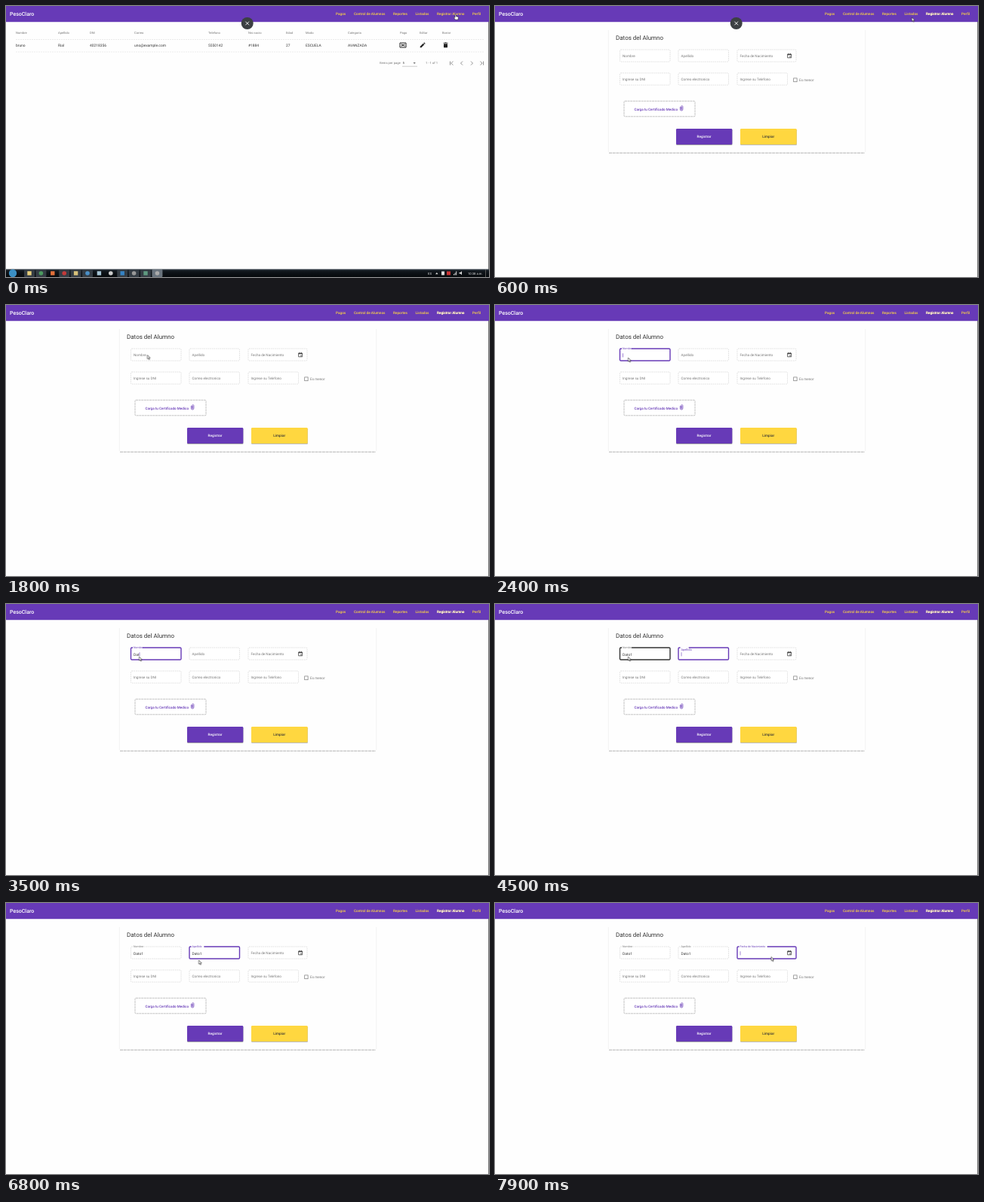
Recreate the animation shown at these times as an HTML page. Size 640x360 px, loop 8 s.

```html
<!DOCTYPE html>
<html lang="es">
<head>
<meta charset="utf-8">
<title>Registro de alumnos</title>
<style>
  html, body { margin: 0; width: 100%; height: 100%; overflow: hidden; background: #fefefe; }
  svg { display: block; width: 100%; height: 100%; }
  text { font-family: Roboto, "Liberation Sans", sans-serif; font-size: 4.65px; text-rendering: geometricPrecision; }
  .nav { fill: #ffd740; font-weight: 500; }
  .nav text { font-size: 4.7px; }
  .head text { fill: #777; font-size: 4.1px; }
  .row text { fill: #333; font-size: 4.9px; }
  .dim { fill: #777; }
  .strong { font-weight: 500; }
  .rule { stroke: #ddd; stroke-width: .6; stroke-dasharray: 2 1; }
  .icon { fill: none; stroke: #777; stroke-width: .8; }
  .box { fill: #fff; stroke: #ccc; stroke-width: .6; stroke-dasharray: 1.6 1; }
  .box.hover { stroke: #333; stroke-width: 1.4; stroke-dasharray: none; }
  .box.focus { stroke: #673ab7; stroke-width: 1.4; stroke-dasharray: none; }
  .label { fill: #777; }
  .label.focus { fill: #673ab7; }
  .value { fill: #333; font-size: 4.9px; }

  .list, .form, .lit, .bar, .close, .pointer, .hand, .arrow { animation: 8s linear infinite; }
  .list, .hand { animation-name: before; }
  .form, .lit, .arrow { animation-name: after; }
  .bar { animation-name: bar; }
  .close { animation-name: close; }
  .pointer { animation-name: pointer; }
  @keyframes before { 0%, 4.99% { visibility: visible } 5%, 100% { visibility: hidden } }
  @keyframes after { 0%, 4.99% { visibility: hidden } 5%, 100% { visibility: visible } }
  @keyframes bar { 0%, 2.49% { visibility: visible } 2.5%, 100% { visibility: hidden } }
  @keyframes close {
    0%, 19.4% { transform: translate(0, 0); animation-timing-function: ease-in }
    21.9%, 100% { transform: translate(0, -34px) }
  }
  @keyframes pointer {
    0%, 5% { transform: translate(595px, 11px); animation-timing-function: ease-in-out }
    15% { transform: translate(268px, 42px); animation-timing-function: ease-in-out }
    25%, 28% { transform: translate(175.5px, 70px) }
    30%, 76.9% { transform: translate(176.5px, 70px); animation-timing-function: ease-in-out }
    82.5%, 89.4% { transform: translate(255.5px, 76px); animation-timing-function: ease-in-out }
    93.6%, 100% { transform: translate(366px, 71.5px) }
  }
</style>
</head>
<body>
<svg viewBox="0 0 640 360" preserveAspectRatio="none">
  <defs>
    <linearGradient id="glass" x2="0" y2="1">
      <stop offset="0" stop-color="#3c4650"/>
      <stop offset=".25" stop-color="#10161c"/>
      <stop offset="1" stop-color="#05080b"/>
    </linearGradient>
  </defs>
  <rect width="640" height="360" fill="#fefefe"/>

  <g class="list">
    <g class="head" id="head"></g>
    <g class="row" id="row"></g>
    <path class="rule" d="M13 44.5H634M13 61H634"/>
    <g fill="#222">
      <path d="M522 49h8v6h-8z" fill="none" stroke="#222"/>
      <path d="M524.4 50v4M527.8 50v4" stroke="#222" stroke-width=".7"/>
      <circle cx="526" cy="52" r="1.1"/>
      <path d="M548.7 55.3v-1.6l4-4 1.6 1.6-4 4zM553.2 49.2l.9-.9 1.6 1.6-.9.9z"/>
      <path d="M580 50.2h5v4.2q0 .9-.9.9h-3.2q-.9 0-.9-.9zM579.5 48.8h1.7l.5-.5h1.6l.5.5h1.7v.8h-6z"/>
    </g>
    <text class="dim" x="495" y="77.4" font-size="4.2" style="font-size:4.2px">Items per page</text>
    <text x="525.5" y="77.4" fill="#444" style="font-size:4.2px">5</text>
    <path d="M539.5 75h3.4l-1.7 1.8z" fill="#666"/>
    <path d="M525 80.2h20" stroke="#aaa" stroke-width=".6"/>
    <text class="dim" x="556" y="77.4" style="font-size:4.2px">1 - 1 of 1</text>
    <path class="icon" d="M588.5 73.5v5M592.3 73.5l-2.5 2.5 2.5 2.5M605 73.5l-2.5 2.5 2.5 2.5M616 73.5l2.5 2.5-2.5 2.5M628.5 73.5l2.5 2.5-2.5 2.5M632.5 73.5v5"/>
  </g>

  <g class="form">
    <rect x="150" y="24" width="341" height="171" fill="#fefefe"/>
    <path d="M150.3 32V194M490.7 32V194" stroke="#eee" stroke-width=".7"/>
    <path d="M151 195.2H490" stroke="#aaa" stroke-width=".9" stroke-dasharray="4 .7"/>
    <text x="160" y="45.3" fill="#333" style="font-size:8px">Datos del Alumno</text>
    <g id="fields"></g>
    <g fill="none" stroke="#444" stroke-width=".8">
      <path d="M387.6 64h5v4.8h-5zM388.8 62.8v1M391.4 62.8v1"/>
      <path d="M387.6 64.6h5" stroke-width="1.3"/>
      <path d="M390.3 67h1.2v1h-1.2z" stroke-width=".5"/>
    </g>
    <rect x="395.7" y="95.9" width="4.4" height="4.8" fill="#fff" stroke="#777" stroke-width=".7"/>
    <text class="dim" x="403" y="99.8">Es menor</text>
    <rect x="171" y="126.3" width="94" height="20.5" rx="1" fill="#fff" stroke="#aaa" stroke-width=".7" stroke-dasharray="3 .6"/>
    <text class="strong" x="184.5" y="139.3" fill="#673ab7" style="font-size:4.6px">Carga tu Certificado Medico</text>
    <path d="M245.3 134v3.2a1.8 1.8 0 0 0 3.6 0v-3.4a1.2 1.2 0 0 0-2.4 0v3.2a.5.5 0 0 0 1.2 0V134" fill="none" stroke="#673ab7" stroke-width=".7"/>
    <g text-anchor="middle" class="strong">
      <rect x="240" y="164" width="74.5" height="21" rx="1.3" fill="#aaa"/>
      <rect x="240" y="163" width="74.3" height="21" rx="1.3" fill="#673ab7"/>
      <text x="277" y="175.2" fill="#fff">Registrar</text>
      <rect x="325" y="164" width="75" height="21" rx="1.3" fill="#bbb"/>
      <rect x="325" y="163" width="74.7" height="21" rx="1.3" fill="#ffd740"/>
      <text x="362.2" y="175.2" fill="#333">Limpiar</text>
    </g>
  </g>

  <rect width="640" height="21.2" fill="#673ab7"/>
  <text class="strong" x="5" y="13.2" fill="#fff" style="font-size:7px">PesoClaro</text>
  <g class="nav">
    <text x="437" y="12.3">Pagos</text>
    <text x="461" y="12.3">Control de Alumnos</text>
    <text x="513" y="12.3">Reportes</text>
    <text x="542.5" y="12.3">Listados</text>
    <text x="571" y="12.3">Registrar Alumno</text>
    <text class="lit" x="571" y="12.3" fill="#fff">Registrar Alumno</text>
    <text x="618" y="12.3">Perfil</text>
  </g>
  <path d="M639.5 21V360" stroke="#555" stroke-width=".8"/>

  <g class="close">
    <circle cx="319.7" cy="23" r="8" fill="#3c4043"/>
    <path d="M317.4 20.7l4.6 4.6M322 20.7l-4.6 4.6" stroke="#fff" stroke-width=".9"/>
  </g>

  <g class="bar">
    <rect y="349.5" width="640" height="10.5" fill="url(#glass)"/>
    <circle cx="9" cy="355" r="5.2" fill="#3b8fc4"/>
    <g id="tasks"></g>
    <g fill="#ddd">
      <text x="559" y="356.5" style="font-size:4.2px">ES</text>
      <path d="M569 356.2l1.8-2.2 1.8 2.2zM577 352.5h4v5h-4zM593 357.5v-1.5h1v1.5zM594.6 357.5v-3h1v3zM596.2 357.5v-5h1v5zM600.5 354h1.5l2-1.7v5l-2-1.7h-1.5z"/>
      <rect x="584" y="352.5" width="5" height="5" fill="#c33"/>
      <text x="612" y="356.7" style="font-size:4.2px">10:38 a.m.</text>
    </g>
    <path d="M635.5 350V360" stroke="#555"/>
  </g>

  <g class="pointer" stroke="#222" stroke-width=".6" fill="#fff" stroke-linejoin="round">
    <path class="hand" d="M0 .5q.7-.9 1.3 0v2.2l2.8.7q.6.3.4 1l-.6 2.8H.4l-2-2.7q0-.9.9-.6l.7.6z"/>
    <path class="arrow" d="M0 0v5.2l1.2-1 .9 1.9.9-.4-.9-1.9h1.7z"/>
  </g>
</svg>
<script>
const LOOP = 8000, BLINK = 530, FLOAT = 150;
const $ = id => document.getElementById(id);

function add(parent, tag, attrs, content = "") {
  const el = document.createElementNS("http://www.w3.org/2000/svg", tag);
  for (const key in attrs) el.setAttribute(key, attrs[key]);
  el.textContent = content;
  return parent.appendChild(el);
}

const columns = [
  [13, "Nombre", "bruno"], [69, "Apellido", "Rial"], [111, "DNI", "40218356"],
  [170, "Correo", "uno@example.com"], [268, "Telefono", "5550142"], [321, "Nro socio", "#1884"],
  [371, "Edad", "27"], [397, "Modo", "ESCUELA"], [453, "Categoria", "AVANZADA"],
  [522, "Pago", ""], [548, "Editar", ""], [578, "Borrar", ""]
];
for (const [x, title, value] of columns) {
  add($("head"), "text", { x, y: 37 }, title);
  add($("row"), "text", { x, y: 54.2 }, value);
}

// Plain taskbar marks: squares for windows, circles for round programs.
const marks = ["#e8cf7a", "#4b9a5f", "#e2703a", "#c33a3a", "#d9c27a", "#4a90c8",
  "#a5c4d4", "#ccc", "#3583c5", "#999", "#5f9a80", "#aaa"];
marks.forEach((fill, i) => {
  const x = 31 + i * 15.4;
  if (![2, 6, 7].includes(i)) {
    add($("tasks"), "rect", { x: x - 7, y: 350, width: 14, height: 10, rx: 1, fill: i === 11 ? "#69737d" : "#343c44" });
  }
  if (i % 2) add($("tasks"), "circle", { cx: x, cy: 355, r: 2.8, fill });
  else add($("tasks"), "rect", { x: x - 2.7, y: 352.3, width: 5.4, height: 5.4, fill });
});

// Times in ms: focus, blur, hover spans and one entry per typed key.
const specs = [
  { x: 165.5, y: 58, label: "Nombre", word: "Dato1", focus: 2150, blur: 4400,
    hover: [[1900, 2150], [4400, 6320]], keys: [2900, 3100, 3300, 3700, 4000] },
  { x: 243, y: 58, label: "Apellido", word: "Dato1", focus: 4400, blur: 7500,
    keys: [4700, 4900, 5050, 5200, 6000] },
  { x: 321, y: 58, w: 78, label: "Fecha de Nacimiento", focus: 7500, blur: LOOP, hover: [[7400, 7500]] },
  { x: 165.5, y: 89, label: "Ingrese su DNI" },
  { x: 243, y: 89, label: "Correo electronico" },
  { x: 321, y: 89, label: "Ingrese su Telefono" }
];

const fields = specs.map(spec => {
  const { x, y, w = 66.5, label } = spec, root = $("fields");
  return {
    word: "", focus: Infinity, blur: Infinity, hover: [], keys: [], ...spec,
    box: add(root, "rect", { class: "box", x, y, width: w, height: 16, rx: 1.3 }),
    notch: add(root, "rect", { x: x + 2.5, y: y - 1, height: 2, fill: "#fefefe" }),
    tag: add(root, "text", { x: x + 3.5 }, label),
    value: add(root, "text", { class: "value", x: x + 3.5, y: y + 10.6 }),
    caret: add(root, "rect", { y: y + 6.2, width: .6, height: 5.2, fill: "#673ab7" })
  };
});

function drawField(f, t) {
  const focused = t >= f.focus && t < f.blur;
  const hovered = f.hover.some(([from, to]) => t >= from && t < to);
  const lift = Math.min(1, Math.max(0, (t - f.focus) / FLOAT));
  const typed = f.keys.filter(key => t >= key);
  f.box.setAttribute("class", "box" + (focused ? " focus" : hovered ? " hover" : ""));
  f.tag.setAttribute("class", "label" + (focused ? " focus" : ""));
  f.tag.style.fontSize = 4.65 - 1.05 * lift + "px";
  f.tag.setAttribute("y", f.y + 9.6 - 8.4 * lift);
  f.notch.setAttribute("width", lift * (f.label.length * 1.85 + 2));
  f.value.textContent = f.word.slice(0, typed.length);
  const last = typed.length ? typed[typed.length - 1] : f.focus;
  const lit = focused && Math.floor((t - last) / BLINK) % 2 === 0;
  f.caret.setAttribute("visibility", lit ? "inherit" : "hidden");
  if (lit) f.caret.setAttribute("x", f.x + 3.7 + f.value.getComputedTextLength());
}

let start;
function tick(now) {
  start ??= now;
  const t = (now - start) % LOOP;
  fields.forEach(f => drawField(f, t));
  requestAnimationFrame(tick);
}
requestAnimationFrame(tick);
</script>
</body>
</html>
```
